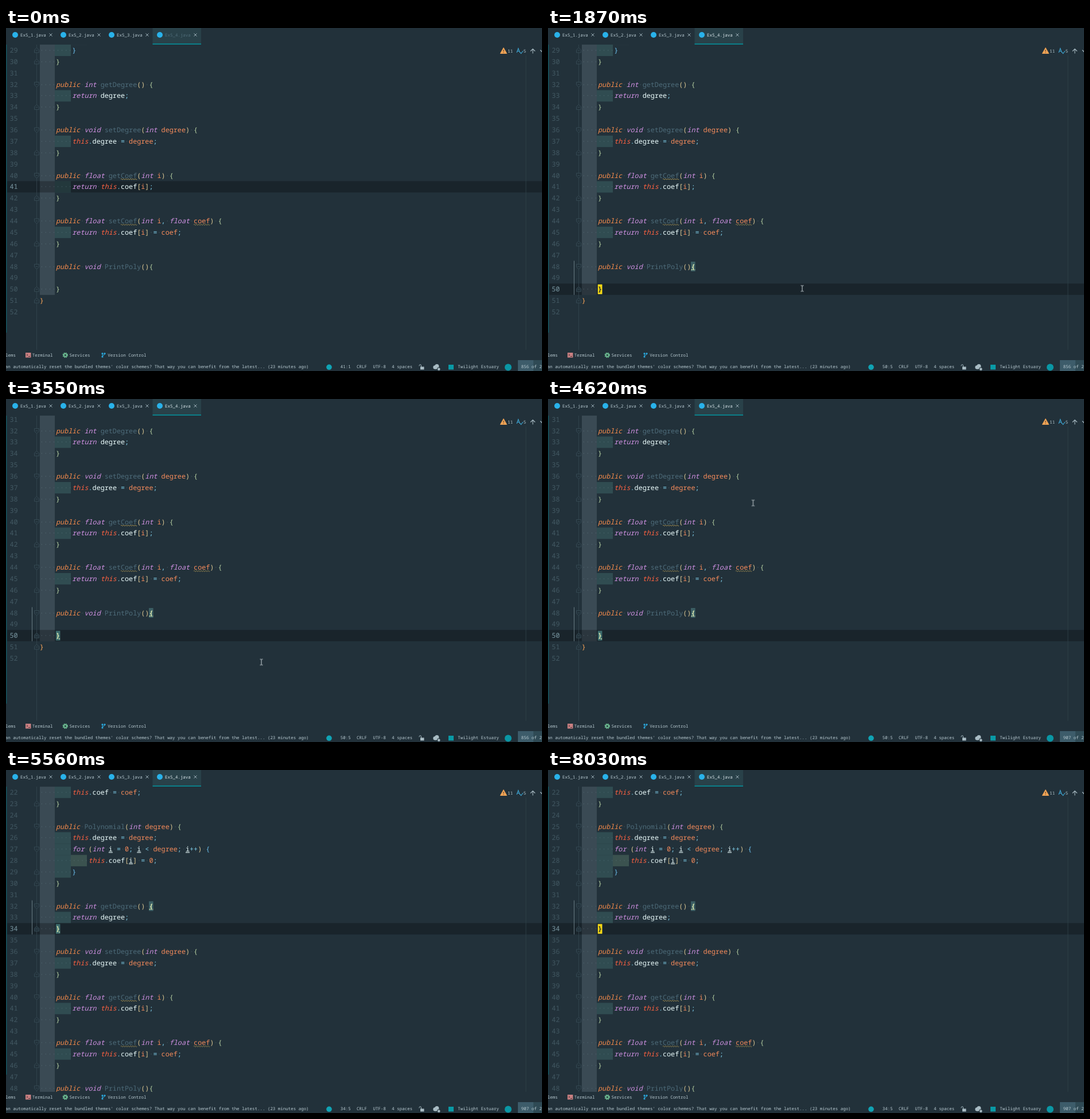
An HTML page for the animation above (8430 ms loop, 934 by 599 pixels).

```html
<!DOCTYPE html>
<html lang="en">
<head>
<meta charset="utf-8">
<title>Code editor</title>
<style>
  html, body { margin: 0; width: 100%; height: 100%; overflow: hidden; background: #22313a; }
  svg { display: block; width: 934px; height: 599px; }
  text { font: 7.47px "Noto Sans Mono", monospace; fill: #b7c9d0; white-space: pre; text-rendering: geometricPrecision; }
  #code text { font-size: 11.77px; }

  #code .num { fill: #435963; }
  #code .now { fill: #6f8993; }
  #code .dot { fill: #82a0aa; fill-opacity: .28; }
  #code .kw { fill: #f78c4c; font-style: italic; }
  #code .type { fill: #d292e4; font-style: italic; }
  #code .self { fill: #ff6242; font-style: italic; }
  #code .method { fill: #4e6c7a; }
  #code .field { fill: #eeffff; }
  #code .loop { fill: #eeffff; text-decoration: underline; }
  #code .param { fill: #f78c5c; }
  #code .op { fill: #82d2ee; }
  #code .paren { fill: #dcc793; }
  #code .b0 { fill: #ffa759; }
  #code .b4 { fill: #b5cfa2; }
  #code .b8 { fill: #6cc0ee; }
  #code .pair { fill: #e3efb4; font-weight: bold; text-decoration: underline; }
  #code .ink { fill: #1c262a; font-weight: bold; }

  #scroll, .s41, .s50, .s34, .p41, .p50, .p34, .m1, .m2, .msg, .z, .blink, .tab, #seen {
    animation: 8.43s step-end infinite;
  }
  #scroll { animation-name: scroll; }
  .s41 { animation-name: s41; }
  .s50 { animation-name: s50; }
  .s34 { animation-name: s34; }
  .p41 { animation-name: p41; }
  .p50 { animation-name: p50; }
  .p34 { animation-name: p34; }
  .m1 { animation-name: m1; }
  .m2 { animation-name: m2; }
  .msg { animation-name: msg; }
  .z { animation-name: z; }
  .blink { animation-name: blink; }
  .tab { animation-name: tab; }
  #seen { animation-name: seen; }
  #mouse { animation: mouse 8.43s linear infinite; }

  @keyframes scroll {
    0% { transform: translateY(0); }
    30.1% { transform: translateY(-43px); }
    65.1%, 100% { transform: translateY(139.1px); }
  }
  @keyframes s41 { 0% { opacity: 1; } 19.6%, 100% { opacity: 0; } }
  @keyframes s50 { 0% { opacity: 0; } 19.6% { opacity: 1; } 58%, 100% { opacity: 0; } }
  @keyframes s34 { 0% { opacity: 0; } 58%, 100% { opacity: 1; } }
  @keyframes p41 { 0% { opacity: 1; } 20.5%, 100% { opacity: 0; } }
  @keyframes p50 { 0% { opacity: 0; } 20.5% { opacity: 1; } 58.8%, 100% { opacity: 0; } }
  @keyframes p34 { 0% { opacity: 0; } 58.8%, 100% { opacity: 1; } }
  @keyframes m1 { 0% { opacity: 1; } 52.4%, 100% { opacity: 0; } }
  @keyframes m2 { 0% { opacity: 0; } 52.4%, 100% { opacity: 1; } }
  @keyframes msg {
    0%, 30.9%, 65.9%, 100% { opacity: 1; }
    28.4%, 62.7% { opacity: 0; }
  }
  @keyframes z {
    0%, 30.9%, 65.9%, 100% { opacity: 0; }
    28.4%, 62.7% { opacity: 1; }
  }
  @keyframes blink {
    0%, 35.7%, 48.3%, 58%, 70.65%, 83.2%, 95.2%, 100% { opacity: 1; }
    30.1%, 42.1%, 54.8%, 65.1%, 76.95%, 88.8% { opacity: 0; }
  }
  @keyframes tab { 0% { fill: #4f6d79; } 19.6%, 100% { fill: #d9e6ea; } }
  @keyframes seen {
    0% { opacity: 0; }
    .8% { opacity: 1; }
    62.7% { opacity: 0; }
    78.6% { opacity: 1; }
    86.6%, 100% { opacity: 0; }
  }
  @keyframes mouse {
    0%, .8% { transform: translate(934px, 556px); animation-timing-function: ease-out; }
    11% { transform: translate(588px, 366px); }
    14.9% { transform: translate(523px, 334px); animation-timing-function: ease-in-out; }
    20.5% { transform: translate(443px, 454px); }
    29%, 33.2% { transform: translate(443px, 458px); }
    33.3%, 48.3% { transform: translate(445px, 459.5px); animation-timing-function: ease-in-out; }
    58%, 62.7% { transform: translate(332px, 101px); }
    62.8%, 78.6% { transform: translate(332px, 115px); animation-timing-function: ease-in-out; }
    86.6%, 100% { transform: translate(936px, 560px); }
  }
</style>
</head>
<body>
<svg id="stage" viewBox="0 0 934 599"></svg>
<script>
const FIRST = 22, CHAR = 7.06, ROW = 19.87;
const rows = `        this.coef = coef;
    }

    public Polynomial(int degree) {
        this.degree = degree;
        for (int i = 0; i < degree; i++) {
            this.coef[i] = 0;
        }
    }

    public int getDegree() {
        return degree;
    }

    public void setDegree(int degree) {
        this.degree = degree;
    }

    public float getCoef(int i) {
        return this.coef[i];
    }

    public float setCoef(int i, float coef) {
        return this.coef[i] = coef;
    }

    public void PrintPoly(){

    }
}
`.split('\n');

const colX = c => 58.8 + c * CHAR;
const rowY = n => 39 + (n - 29) * ROW;
const rect = (x, y, w, h, fill, more = '') =>
  `<rect x="${x}" y="${y}" width="${w}" height="${h}" fill="${fill}" ${more}/>`;
const path = (d, stroke, more = '') =>
  `<path d="${d}" stroke="${stroke}" fill="none" ${more}/>`;
const dot = (x, y, r, fill) => `<circle cx="${x}" cy="${y}" r="${r}" fill="${fill}"/>`;
const text = (x, y, s, cls = '') =>
  `<text x="${x}" y="${y}" class="${cls}">${s.replace('<', '&lt;')}</text>`;
const group = (cls, body) => `<g class="${cls}">${body}</g>`;

function kind(tok, at, row, indent) {
  if (tok === 'public') return 'kw';
  if (/^(int|float|void|return|for)$/.test(tok)) return 'type';
  if (tok === 'this') return 'self';
  if (/[{}]/.test(tok)) return 'b' + indent;
  if (/[()[\]]/.test(tok)) return 'paren';
  if (/\W/.test(tok)) return 'op';
  if (row[at + tok.length] === '(') return 'method';
  if (row[at - 1] === '.' || row.includes('return degree')) return 'field';
  if (tok === 'i' && /for|= 0/.test(row)) return 'loop';
  return 'param';
}

function squiggle(col, y) {
  let d = `M${colX(col)} ${y}`;
  for (let i = 0; i < 7; i++) d += 'q1-2 2 0t2 0';
  return path(d, '#b39a55', 'stroke-width=".9"');
}

function fold(y, opens) {
  const s = opens ? 1 : -1;
  return path(`M49.5 ${y - 4 * s}h8v${5 * s}l-4 ${3.5 * s}l-4 ${-3.5 * s}zM51.5 ${y}h4`,
    '#3c515b', 'style="fill:#22313a" stroke-width=".8"');
}

function drawRow(row, i) {
  const n = FIRST + i, y = rowY(n), base = y + 4;
  const indent = row.search(/\S/);
  let out = text(6.5, base, String(n), 'num');
  if (indent >= 0) out += text(colX(0), base, row.replace(/\S/g, '\u00a0').replace(/ /g, '·'), 'dot');
  for (const m of row.matchAll(/\w+|[^\s\w]/g)) {
    out += text(colX(m.index), base, m[0], kind(m[0], m.index, row, indent));
  }
  for (const m of row.matchAll(/Coef|coef(?=\))/g)) out += squiggle(m.index, y + 6.5);
  if (/[{}]$/.test(row)) out += fold(y, row.endsWith('{'));
  return out;
}

function indents() {
  let out = rect(59, rowY(22) - 10, 26, 29 * ROW, '#3a4a54');
  rows.forEach((row, i) => {
    const indent = row.search(/\S/), top = rowY(FIRST + i) - 10;
    if (indent >= 8) out += rect(85, top, 28, ROW + .1, '#304c51');
    if (indent >= 12) out += rect(113, top, 28, ROW + .1, '#3b524f');
  });
  return out;
}

// Translucent, so the indent guides show through
const band = n => group('s' + n, rect(2, rowY(n) - 10, 932, 19.8, '#000', 'fill-opacity=".26"'));

// Current line number, scope line and the matched braces of a method
function active(n, open) {
  const y = rowY(n), top = rowY(open);
  const box = (x, cy, fill) => rect(x, cy - 8.5, 7.6, 17, fill);
  return group('s' + n,
    text(6.5, y + 4, String(n), 'now') +
    rect(45, top - 10, 1, y - top + 19.8, '#687b83') +
    box(249, top, '#3c5f64') + text(colX(27), top + 4, '{', 'pair') +
    box(86.8, y, '#3c6a6b') + text(colX(4), y + 4, '}', 'pair') +
    group('blink', box(86.8, y, '#f4d613') + text(colX(4), y + 4, '}', 'ink')));
}

function editor() {
  return `<g id="code" clip-path="url(#view)"><g id="scroll">` +
    indents() + band(41) + band(50) + band(34) +
    rect(53, -200, .8, 900, '#35474f') +
    rows.map(drawRow).join('') +
    group('s41', text(6.5, rowY(41) + 4, '41', 'now')) +
    active(50, 48) + active(34, 32) + '</g></g>' +
    rect(0, 29, 1.6, 503, '#14505a') +
    rect(905.6, 48, .8, 514, '#31444d');
}

function tabs() {
  let out = rect(255.5, 0, 84.5, 29, '#294149') + rect(255.5, 27, 84.5, 2, '#0b8089');
  for (let i = 0; i < 4; i++) {
    const x = 16 + 84 * i;
    out += dot(x, 12, 5, '#29b2ea') + text(x + 9, 14.7, `Ex5_${i + 1}.java`, i === 3 ? 'tab' : '') +
      path(`M${x + 59.5} 9.5l5 5m0-5l-5 5`, '#a9bcc4', 'stroke-width=".9"');
  }
  return out;
}

function inspections() {
  return '<path d="M867 34.5l5.6 10h-11.2z" fill="#f2a455" stroke="#f2a455" stroke-linejoin="round"/>' +
    path('M867 38v3m0 1.2v1.2', '#3a3330') + text(874.3, 42.5, '11') +
    path('M890 43l2.7-7.5l2.7 7.5m-4.5-2.5h3.5M895.5 42l2 2.5l3.5-4.5', '#3fa9d8', 'stroke-width="1.1"') +
    text(901.8, 42.5, '5') +
    path('M918 44.5v-8m-4 4l4-4l4 4M931 38.5l4 4', '#a9bcc4', 'stroke-width="1.1"');
}

function toolbar() {
  return text(-1, 574, 'lems') +
    rect(34, 567, 9.5, 8.5, '#c98082') + path('M35.8 569l2 2l-2 2m3.2 .5h3', '#35292d', 'stroke-width=".9"') +
    text(45.7, 574, 'Terminal') +
    '<circle cx="103.3" cy="571.3" r="3.8" fill="none" stroke="#6cba91" stroke-width="1.8" stroke-dasharray="2 .98"/>' +
    '<circle cx="103.3" cy="571.3" r="2.4" fill="none" stroke="#6cba91" stroke-width="1.8"/>' +
    text(110.6, 574, 'Services') +
    path('M168 569v5m4-5q0 2.5-4 3', '#2ba8dc') +
    dot(168, 568.5, 1.6, '#2ba8dc') + dot(168, 574, 1.6, '#2ba8dc') + dot(172, 568.5, 1.6, '#2ba8dc') +
    text(177.3, 574, 'Version Control');
}

function statusBar() {
  const y = 594.4, tip = "an automatically reset the bundled themes' color schemes? That way you can benefit from the ";
  const ago = '... (23 minutes ago)';
  return text(-1.2, y, tip + 'latest' + ago, 'msg') + text(-1.2, y, tip + 'lat' + ago, 'z') +
    text(542.8, y, 'z', 'z') + dot(563, 592.3, 4.8, '#10a3b4') +
    text(582.8, y, '41:1', 'p41') + text(582.8, y, '50:5', 'p50') + text(582.8, y, '34:5', 'p34') +
    text(611, y, 'CRLF') + text(639.5, y, 'UTF-8') + text(672.3, y, '4 spaces') +
    rect(722, 591.5, 6.5, 5, '#a9bcc4') + path('M723.5 592v-2.5a1.7 1.7 0 0 0-3.4 0v1', '#a9bcc4') +
    dot(747.5, 592.5, 3.2, '#a9bcc4') + dot(750.8, 590.7, 3.6, '#a9bcc4') +
    rect(747, 591.5, 8, 4.2, '#a9bcc4', 'rx="2"') + dot(754.3, 595.8, 3.2, '#22313a') + dot(754.3, 595.8, 2.3, '#a9bcc4') +
    rect(771, 588, 9, 8.5, '#0a9aa6') + text(787.3, y, 'Twilight Estuary') + dot(875, 592.5, 6, '#0a97a5') +
    rect(892, 580, 42, 19, '#2f4a55') + rect(892, 580, 27, 19, '#3d5c6a') +
    text(897.8, y, '856 of 2', 'm1') + text(897.8, y, '907 of 2', 'm2');
}

const beam = '<g clip-path="url(#view)"><g id="seen"><g id="mouse">' +
  path('M-2.5-5h2l.5.5l.5-.5h2M-2.5 5h2l.5-.5l.5.5h2M0-4.5v9', '#ccd5d9') + '</g></g></g>';

document.getElementById('stage').innerHTML =
  '<clipPath id="view"><rect y="29" width="934" height="533"/></clipPath>' +
  rect(0, 0, 934, 599, '#22313a') + editor() + tabs() + inspections() + toolbar() + statusBar() + beam;
</script>
</body>
</html>
```
